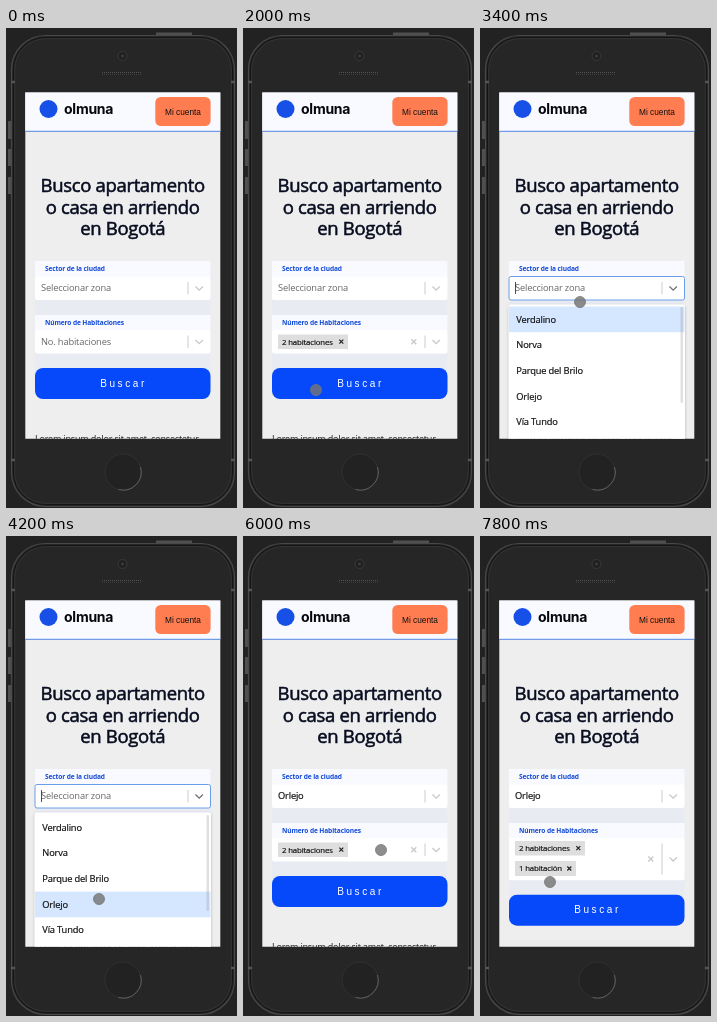
These frames come from a looping animation (231x480 px, 8000 ms). An HTML page:

```html
<!DOCTYPE html>
<html lang="es">
<head>
<meta charset="utf-8">
<title>Búsqueda de apartamentos</title>
<style>
  html, body { margin: 0; width: 100%; height: 100%; overflow: hidden; background: #222; }
  svg { display: block; width: 100%; height: 100%; }
  text { font-family: "Open Sans", "Noto Sans", sans-serif; font-size: 9.3px; letter-spacing: -.018em; fill: #111; }
  .title text { font-size: 18.5px; fill: #080d20; stroke: #080d20; stroke-width: .55px; text-anchor: middle; }
  .brand { font: 700 14px Inter, sans-serif; fill: #05070d; }
  .account, .search text { font-family: "Liberation Sans", Arial, sans-serif; text-anchor: middle; }
  .account { font-size: 8.3px; letter-spacing: 0; }
  .search text { font-size: 10px; letter-spacing: 2.6px; fill: #fff; }
  .label { font-size: 6.6px; font-weight: 700; fill: #1149d8; }
  .hint { fill: #666; }
  .tag text { font-size: 7.8px; }
  .tag text, #options text, #zoneText { stroke: #111; stroke-width: .2px; }
  #zoneText.hint { stroke: none; }
  .box { fill: #fff; stroke: none; }
  .icon { fill: none; stroke: #c8c8c8; stroke-width: 1.3; }
  .rule { stroke: #ccc; stroke-width: 1; }
  .caret { stroke: #222; stroke-width: .8; visibility: hidden; }
  .open .box { stroke: #6b9eea; stroke-width: 1; }
  .open .icon { stroke: #707070; }
  .open .caret { visibility: visible; }
</style>
</head>
<body>
<svg viewBox="0 0 231 480" preserveAspectRatio="none">
  <defs>
    <clipPath id="screen"><path id="glass" d="M19.300 64.500h195v346.200h-195z"/></clipPath>
    <filter id="shadow"><feDropShadow dx="0" dy="1" stdDeviation="1.5" flood-opacity=".25"/></filter>
    <pattern id="mesh" width="2" height="2" patternUnits="userSpaceOnUse">
      <path d="M0 0h1v1H0z" fill="#555"/>
    </pattern>
  </defs>

  <path d="M0 0h231v480H0z" fill="#222"/>
  <g fill="#505050">
    <path d="M150 4.500h36v3h-36z"/>
    <path id="sideButtons" d="M2 93h3v18h-3zM2 121h3v17h-3zM2 149h3v17h-3z"/>
  </g>
  <rect x="5.5" y="7.500" width="223" height="471" rx="34" fill="#262626" stroke="#484848" stroke-width="1.2"/>
  <rect x="7.500" y="9.500" width="219" height="467" rx="32" fill="none" stroke="#141414"/>
  <rect x="8.700" y="10.700" width="216.600" height="464.600" rx="31" fill="none" stroke="#383838" stroke-width=".8"/>
  <path d="M5 54h4m216 0h4M5 432h4m216 0h4" stroke="#555" stroke-width="2.500"/>
  <circle cx="116.500" cy="28" r="4.500" fill="#202020" stroke="#3a3a3a"/>
  <circle cx="116.500" cy="28" r="1.500" fill="#3a3a40"/>
  <path d="M96 43h40v3.500H96z" fill="url(#mesh)"/>
  <circle cx="117" cy="444" r="18" fill="#222" stroke="#303030"/>
  <path d="M134.500 439a18 18 0 0 1-22 22.500" fill="none" stroke="#606060"/>

  <g clip-path="url(#screen)">
    <path d="M19 64h196v347H19z" fill="#eee"/>
    <path d="M19 64h196v39H19z" fill="#f8faff"/>
    <path d="M19 103.300h196" stroke="#5488e6"/>
    <circle cx="42.5" cy="81" r="9" fill="#1750e6"/>
    <text class="brand" x="58" y="86">olmuna</text>
    <rect x="149.300" y="69" width="55.300" height="29" rx="5.500" fill="#ff7d50"/>
    <text class="account" x="177" y="87">Mi cuenta</text>

    <g class="title">
      <text x="116.700" y="163.600">Busco apartamento</text>
      <text x="116.700" y="185.500">o casa en arriendo</text>
      <text x="116.700" y="207.400">en Bogotá</text>
    </g>

    <rect id="form" x="29" y="233" width="175.5" height="126" fill="#e8ebf2"/>

    <g id="zone">
      <path d="M29 233h175.5v16H29z" fill="#f8faff"/>
      <text class="label" x="39" y="243">Sector de la ciudad</text>
      <rect class="box" x="29" y="248.5" width="175.5" height="23.5" rx="2"/>
      <text id="zoneText" x="35" y="263"></text>
      <path class="caret" d="M35.5 254v12"/>
      <path class="rule" d="M182 254v12.5"/>
      <path class="icon" d="M189.5 258.5l3.7 3.7 3.7-3.7"/>
    </g>

    <g id="rooms">
      <path d="M29 287h175.5v16H29z" fill="#f8faff"/>
      <text class="label" x="39" y="297">Número de Habitaciones</text>
      <rect class="box" id="roomsBox" x="29" y="302" width="175.5" height="23.5" rx="2"/>
      <text class="hint" id="roomsHint" x="35" y="316.700">No. habitaciones</text>
      <path class="caret" id="roomsCaret" d="M0 307.5v12"/>
      <g class="tag" id="tagTwo">
        <path d="M35 306.5h70v14.5H35z" fill="#dedede"/>
        <text x="39" y="316.500">2 habitaciones</text>
        <path d="M96.3 311.7l4 4m0-4l-4 4" stroke="#222" stroke-width="1.2"/>
      </g>
      <g class="tag" id="tagOne">
        <path d="M35 325h61v15H35z" fill="#dedede"/>
        <text x="39" y="335">1 habitación</text>
        <path d="M87.3 330.5l4 4m0-4l-4 4" stroke="#222" stroke-width="1.2"/>
      </g>
      <path class="rule" id="roomsRule"/>
      <g id="roomsIcons">
        <path class="icon" id="clear" d="M168.3 311.2l5 5m0-5l-5 5"/>
        <path class="icon" d="M189.5 312l3.7 3.7 3.7-3.7"/>
      </g>
    </g>

    <g id="below">
      <g class="search">
        <rect x="29" y="340" width="175.5" height="31" rx="8" fill="#0549fb"/>
        <text x="117.5" y="358.5">Buscar</text>
      </g>
      <text x="29" y="414" style="font-size:9px">Lorem ipsum dolor sit amet, consectetur</text>
    </g>

    <g id="menu">
      <rect x="28.700" y="0" width="176.300" height="200" rx="2" fill="#fff" filter="url(#shadow)"/>
      <rect id="hover" x="29" width="175.5" height="25.7" fill="#d5e6ff"/>
      <g id="options"></g>
      <rect id="scrollbar" x="200.500" y="2.500" width="2.500" height="96" rx="1.2" fill="#999" fill-opacity=".3"/>
    </g>
  </g>

  <circle id="cursor" r="5.5" fill="#747474" fill-opacity=".82" stroke="#777" stroke-width=".8"/>
</svg>

<script>
  const LOOP = 8000, STEP = 200, ROW = 25.7;
  const $ = id => document.getElementById(id);
  const show = (id, on) => $(id).style.display = on ? '' : 'none';
  const shift = (id, x, y) => $(id).setAttribute('transform', `translate(${x} ${y})`);
  const set = (id, attrs) => Object.entries(attrs).forEach(([k, v]) => $(id).setAttribute(k, v));

  const zones = ['Verdalino', 'Norva', 'Parque del Brilo', 'Orlejo', 'Vía Tundo'];
  const rooms = ['1 habitación', '2 habitaciones', '3 habitaciones', '4 habitaciones'];
  const menus = [
    { from: 600, to: 1800, field: 'rooms', top: 330, items: rooms },
    { from: 3200, to: 4400, field: 'zone', top: 276.5, items: zones },
    { from: 6200, to: 7600, field: 'rooms', top: 330, items: rooms.filter((_, i) => i !== 1) }
  ];
  // time, x, y
  const path = [
    [200, 172, 368], [600, 153, 318], [800, 151, 317], [1000, 146, 322], [1400, 88, 365],
    [1600, 74, 368], [2000, 73, 362], [2400, 73, 362], [3000, 100, 264], [3200, 100, 264],
    [3400, 100, 274], [4000, 93, 364], [4400, 93, 362], [4600, 93, 343], [5000, 93, 343],
    [6000, 138, 314], [6600, 138, 314], [7200, 75, 344], [7400, 70, 346], [8000, 70, 346]
  ];

  function cursorAt(t) {
    const i = Math.max(1, path.findIndex(p => p[0] >= t));
    const [t0, x0, y0] = path[i - 1], [t1, x1, y1] = path[i];
    const k = Math.max(0, (t - t0) / (t1 - t0));
    return [x0 + (x1 - x0) * k, y0 + (y1 - y0) * k];
  }

  function drawMenu(menu, y) {
    show('menu', menu);
    for (const id of ['zone', 'rooms']) $(id).classList.toggle('open', !!menu && menu.field === id);
    if (!menu) return;
    shift('menu', 0, menu.top);
    show('scrollbar', menu.field === 'zone');
    const row = Math.floor((y - menu.top - 2) / ROW);
    set('hover', { y: 2 + Math.min(Math.max(row, 0), menu.items.length - 1) * ROW });
    $('options').innerHTML = menu.items
      .map((item, i) => `<text x="36.3" y="${18 + i * ROW}">${item}</text>`).join('');
  }

  function draw(t) {
    const [x, y] = cursorAt(t);
    const hasTwo = t >= menus[0].to, hasZone = t >= menus[1].to, hasOne = t >= menus[2].to;
    const grow = hasOne ? 18.7 : 0;

    show('cursor', t >= 200);
    set('cursor', { cx: x, cy: y });
    drawMenu(menus.find(m => t >= m.from && t < m.to), y);

    $('zoneText').textContent = hasZone ? zones[3] : 'Seleccionar zona';
    set('zoneText', { class: hasZone ? '' : 'hint' });

    show('roomsHint', !hasTwo);
    show('tagTwo', hasTwo);
    show('tagOne', hasOne);
    show('clear', hasTwo);
    shift('tagTwo', 0, hasOne ? -1.5 : 0);
    shift('roomsCaret', hasTwo ? 108 : 35.5, 0);
    set('roomsBox', { height: 23.5 + grow });
    set('roomsRule', { d: `M182 307.5v${12.5 + grow}` });
    shift('roomsIcons', 0, grow / 2);
    set('form', { height: 126 + grow });
    shift('below', 0, grow);
  }

  const start = performance.now();
  function tick() {
    const t = (performance.now() - start) % LOOP;
    draw(Math.floor(t / STEP) * STEP);
    requestAnimationFrame(tick);
  }
  tick();
</script>
</body>
</html>
```
